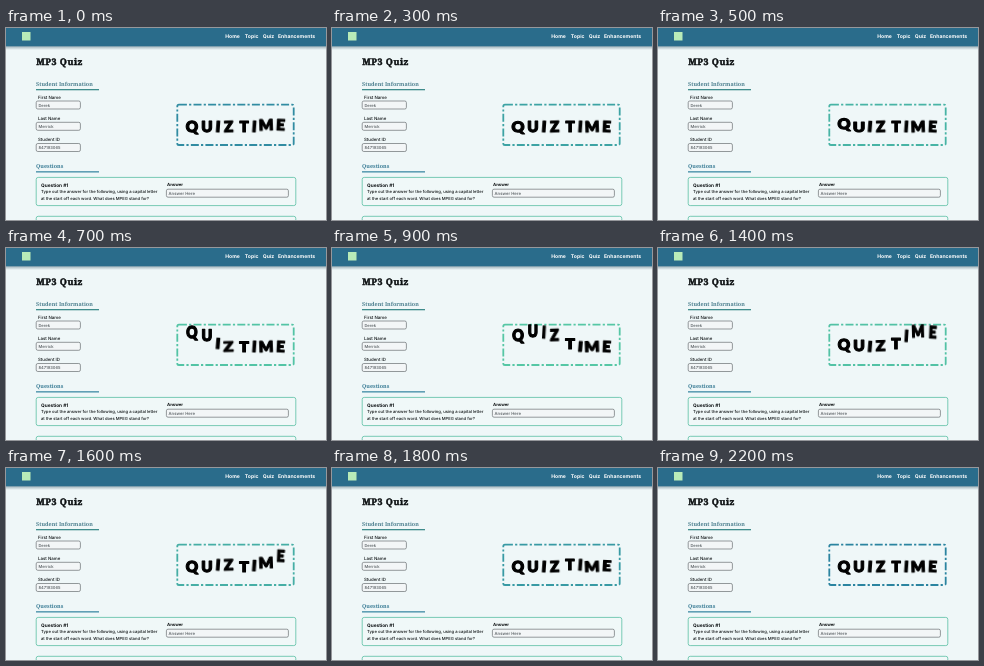
Recreate the animation shown at these times as an HTML page. Size 320 by 192 pixels, loop 2.3 s.

```html
<!DOCTYPE html>
<html lang="en">
<head>
<meta charset="utf-8">
<title>MP3 Quiz</title>
<style>
  html, body { margin: 0; width: 100%; height: 100%; overflow: hidden; background: #eff7f8; }
  svg { display: block; width: 320px; height: 192px; }
  text { font-family: Inter, "Open Sans", sans-serif; text-rendering: geometricPrecision; fill: #0c1012; }
  .serif { font-family: "Noto Serif", "DejaVu Serif", serif; }
  .title { stroke: #0c1012; stroke-width: .45; }
  .field { fill: #f3f6f7; stroke: #6b7073; stroke-width: .7; }
  .card { fill: #f0f8f8; stroke: #5abfa4; stroke-width: .8; }
  .banner { fill: none; stroke-width: 1.8; stroke-dasharray: 8 2.2 2.2 2.2; }
  .letter {
    font: 900 15.2px Lato, "Open Sans", sans-serif; text-anchor: middle;
    fill: #000; stroke: #000; stroke-width: 1.1; stroke-linejoin: round;
  }
</style>
</head>
<body>
<svg id="stage" viewBox="0 0 320 192">
  <defs>
    <linearGradient id="shade" x2="0" y2="1">
      <stop stop-color="#54717f" stop-opacity=".55"/>
      <stop offset="1" stop-color="#54717f" stop-opacity="0"/>
    </linearGradient>
  </defs>
  <rect width="320" height="192" fill="#eff7f8"/>
  <rect y="18" width="320" height="4" fill="url(#shade)"/>
  <rect width="320" height="18.3" fill="#2a6c8b"/>
  <rect x="16" y="4" width="8.5" height="8.5" fill="#b9ebb8"/>
  <rect x="30" y="61" width="63" height="1.3" fill="#3f8c8c"/>
  <rect x="30" y="143.2" width="63" height="1.3" fill="#3f8ba6"/>
  <rect class="card" x="30.2" y="149.4" width="259.6" height="28.2" rx="2"/>
  <rect class="card" x="30.2" y="188.3" width="259.6" height="28" rx="2"/>
  <rect class="banner" id="banner" x="171.3" y="76.6" width="116.4" height="40.4" rx="1.6"/>
</svg>
<script>
const LOOP = 2300, STEP = 100, JUMP = 2000, LEAD = 265, LAG = 100, FLOOR = 103.7;
const stage = document.getElementById("stage");

function add(tag, attrs, parent = stage) {
  const node = document.createElementNS("http://www.w3.org/2000/svg", tag);
  for (const key in attrs) node.setAttribute(key, attrs[key]);
  return parent.appendChild(node);
}

function label(text, x, y, size, weight = 450, extra = {}) {
  const node = add("text", { x, y, "font-size": size, "font-weight": weight, ...extra });
  node.textContent = text;
}

function field(x, y, width, value, size) {
  add("rect", { class: "field", x, y, width, height: 8, rx: 1.6 });
  label(value, x + 2.2, y + 5.5, size, 450, { style: "fill:#50575b" });
}

// Page text and form
[["Home", 219.3], ["Topic", 238.8], ["Quiz", 256.8], ["Enhancements", 272]]
  .forEach(([text, x]) => label(text, x, 10.2, 5.1, 700, { style: "fill:#fff" }));

label("MP3 Quiz", 30.2, 37, 9, 900, { class: "serif title", "letter-spacing": .5 });
label("Student Information", 30, 57.7, 5.45, 700, { class: "serif", style: "fill:#4f8190" });
label("Questions", 30, 140, 5.45, 700, { class: "serif", style: "fill:#3b7d96" });

[["First Name", "Derek", 73], ["Last Name", "Merrick", 94.3], ["Student ID", "847193065", 115.5]]
  .forEach(([name, value, y]) => {
    label(name, 32, y - 2.3, 4.4, 550);
    field(30.2, y, 44.2, value, 4.1);
  });

label("Question #1", 35, 158.7, 4.75, 750);
label("Type out the answer for the following, using a capital letter", 35, 164.8, 4.18);
label("at the start off each word. What does MPEG stand for?", 35, 171.5, 4.18);
label("Answer", 161, 157.9, 4.25, 700);
field(160.4, 161.2, 122, "Answer Here", 4.25);

// Each letter squashes, leaps, lands and gives a small second hop
const leap = [
  [0, 1, 1, 0], [.1, 1.1, .9, 0], [.3, .9, 1.1, -13], [.5, 1.05, .95, 0],
  [.57, 1, 1, -1.7], [.64, 1, 1, 0], [1, 1, 1, 0]
].map(([offset, sx, sy, y]) => ({
  offset,
  transform: `scale(${sx}, ${sy}) translateY(${y}px)`,
  easing: "cubic-bezier(.28, .84, .42, 1)"
}));

const letters = [
  ["Q", 186, 0], ["U", 201, 0], ["I", 212, 4], ["Z", 222.5, -2],
  ["T", 238, 0], ["I", 248.4, 4], ["M", 260, -2], ["E", 274.7, 3]
];

const jumps = letters.map(([char, x, tilt]) => {
  const group = add("g", { style: `transform-origin:${x}px ${FLOOR}px` });
  const glyph = add("text", {
    class: "letter", x, y: FLOOR, transform: `rotate(${tilt} ${x} ${FLOOR - 6})`
  }, group);
  glyph.textContent = char;
  const anim = group.animate(leap, { duration: JUMP, iterations: Infinity });
  anim.pause();
  return anim;
});

// Border colour by time in ms
const hues = [
  [0, "#318ca2"], [200, "#2b84a0"], [300, "#3da3a4"], [700, "#53c4a5"], [1100, "#58caa4"],
  [1400, "#53c2a5"], [1800, "#389aa4"], [2200, "#2b84a0"], [LOOP, "#2b84a0"]
].map(([time, stroke]) => ({ offset: time / LOOP, stroke }));
const glow = document.getElementById("banner").animate(hues, { duration: LOOP, iterations: Infinity });
glow.pause();

function draw(now) {
  const time = Math.floor(now / STEP) * STEP % LOOP;
  jumps.forEach((anim, i) => { anim.currentTime = time + JUMP - LEAD - i * LAG; });
  glow.currentTime = time;
  requestAnimationFrame(draw);
}
draw(performance.now());
</script>
</body>
</html>
```
